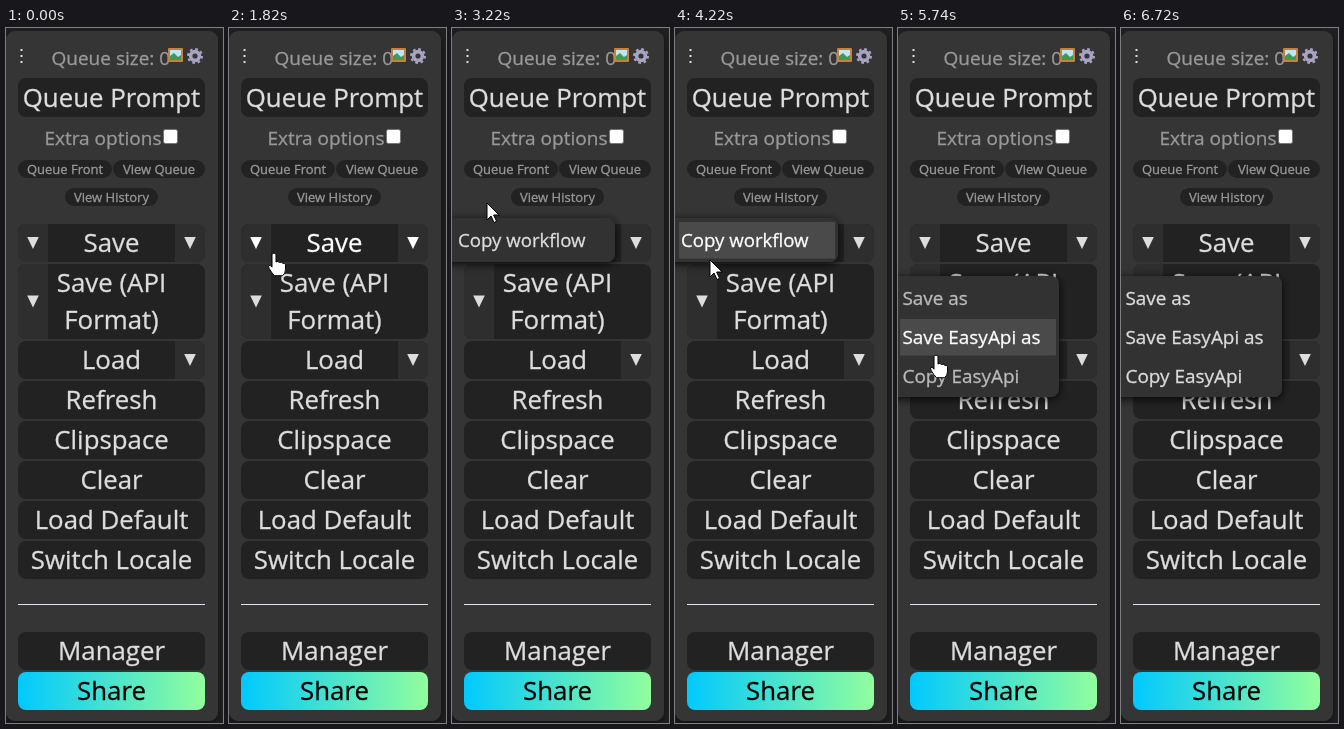
An HTML page that plays this animation: 217 px wide and 695 px high, repeating every 8.13 s.

```html
<!DOCTYPE html>
<html lang="en">
<head>
<meta charset="utf-8">
<title>Queue menu</title>
<style>
html, body { margin: 0; width: 100%; height: 100%; overflow: hidden; background: #202020; }
svg { display: block; }
text {
  font-family: "Open Sans", "Noto Sans", sans-serif;
  fill: currentColor; stroke: currentColor; stroke-width: .3;
}
.mid { text-anchor: middle; }
.btn { font-size: 25.8px; color: #ddd; fill: currentColor; }
.btn rect { fill: #222; }
.btn .cell { fill: #2e2e2e; }
.btn.hot { color: #fff; }
.btn .cell.lit { fill: #4c4c4c; }
.pill { font-size: 13px; color: #999; }
.label { font-size: 19px; color: #999; }
.menu { color: #ddd; }
.menu.bright { color: #f4f4f4; }
.menu.dim { color: #bbb; }
.menu .row { fill: none; }
.menu .hot { color: #fff; }
.menu .hot .row { fill: #4a4a4a; }
#cursor path { fill: #fff; stroke: #000; stroke-width: 1; stroke-linejoin: round; }
</style>
</head>
<body>
<svg id="stage" width="217" height="695" viewBox="0 0 217 695"></svg>
<script>
const LOOP = 8130;
const stage = document.getElementById('stage');
const $ = id => document.getElementById(id);

const box = (x, y, w, h, r, attrs = '') =>
  `<rect x="${x}" y="${y}" width="${w}" height="${h}" rx="${r}" ${attrs}/>`;
const label = (x, y, s, cls = '') => `<text x="${x}" y="${y}" class="${cls}">${s}</text>`;

// text lines, top, height, which sides carry a drop-down cell
const buttons = [
  [['Queue Prompt'], 50, 39, ''],
  [['Save'], 196, 38, 'LR'],
  [['Save (API', 'Format)'], 236, 75, 'L'],
  [['Load'], 313, 38, 'R'],
  [['Refresh'], 353, 38, ''],
  [['Clipspace'], 393, 38, ''],
  [['Clear'], 433, 38, ''],
  [['Load Default'], 473, 38, ''],
  [['Switch Locale'], 513, 38, ''],
  [['Manager'], 604, 38, '']
];
const SAVE = 1, API = 2;

function cell(side, y, h) {
  const left = side === 'L', x = left ? 12 : 169, m = y + h / 2;
  const d = left
    ? `M42 ${y}H20a8 8 0 0 0-8 8v${h - 16}a8 8 0 0 0 8 8h22z`
    : `M169 ${y}h22a8 8 0 0 1 8 8v${h - 16}a8 8 0 0 1-8 8h-22z`;
  return `<path class="cell ${side}" d="${d}"/><path d="M${x + 9.2} ${m - 6}h11.6l-5.8 12z"/>`;
}

function button([lines, y, h, sides], i) {
  const base = y + h / 2 + 9 - (lines.length - 1) * 18.5;
  return `<g class="btn" id="btn${i}">` + box(12, y, 187, h, 8) +
    [...sides].map(s => cell(s, y, h)).join('') +
    lines.map((s, k) => label(105.5, base + k * 37, s, 'mid')).join('') + '</g>';
}

const pill = (x, y, w, s) =>
  box(x, y, w, 18, 9, 'fill="#222"') + label(x + w / 2, y + 13.7, s, 'mid pill');

function menu(id, y, w, h, size, items, tx, rx, ry) {
  const rows = items.map((s, k) =>
    `<g>${box(rx, ry + k * 39, 156, 36.5, 1, 'class="row"')}${label(tx, ry + k * 39 + 25, s)}</g>`);
  return `<g class="menu" id="${id}" font-size="${size}">` +
    box(-12, y, w + 12, h, 8, 'fill="#323232" filter="url(#glow)"') + rows.join('') + '</g>';
}

const shadow = (id, dy, blur, alpha) =>
  `<filter id="${id}" x="-20%" y="-50%" width="140%" height="200%">
    <feDropShadow dx="0" dy="${dy}" stdDeviation="${blur}" flood-opacity="${alpha}"/>
  </filter>`;

stage.innerHTML = `
<defs>
  <linearGradient id="share"><stop stop-color="#00c9ff"/><stop offset="1" stop-color="#92fe9d"/></linearGradient>
  ${shadow('shadow', 4, 4, .5)}${shadow('glow', 2, 5, .85)}
</defs>` +
  box(0, 3, 212, 690, 9, 'fill="#353535" filter="url(#shadow)"') +
  [22, 28, 34].map(y => box(14.5, y - 1, 2, 2, 0, 'fill="#ddd"')).join('') +
  label(45.5, 37, 'Queue size: 0', 'label') +
  box(162, 20, 15, 14, 1, 'fill="#c8803a"') +
  box(164, 22, 11, 10, 0, 'fill="#bfe6f7"') +
  '<path d="M164 32v-4l4-3 4 4 3-2v5z" fill="#3f9a55"/>' +
  `<g fill="none" stroke="#aaa3c2">
    <circle cx="189" cy="28" r="4.4" stroke-width="3.6"/>
    <circle cx="189" cy="28" r="7" stroke-width="2" stroke-dasharray="2.75"/>
  </g>` +
  label(38.5, 116.5, 'Extra options', 'label') +
  box(157.5, 101.5, 14, 14, 2, 'fill="#fff" stroke="#767676"') +
  pill(12, 132, 94, 'Queue Front') +
  pill(107, 132, 92, 'View Queue') +
  pill(59, 160, 93, 'View History') +
  buttons.map(button).join('') +
  box(12, 576, 187, 1, 0, 'fill="#dde3e8"') +
  box(12, 644, 187, 38, 8, 'fill="url(#share)"') +
  '<g font-size="25.8">' + label(105.5, 672, 'Share', 'mid') + '</g>' +
  menu('copyMenu', 190, 163, 44, 18.6, ['Copy workflow'], 6, 4, 194) +
  menu('saveMenu', 248, 161, 121, 18.9, ['Save as', 'Save EasyApi as', 'Copy EasyApi'], 4.5, 2, 252) +
  `<g id="cursor">
    <path id="arrow" d="M0 0V17l4-4 3 6.5 2.6-1.2-3-6.3h5.6z"/>
    <path id="hand" d="M-2 1q2-2 4 0v8q2-1.5 3.5.5 2-1 3.3.8 2-.6 2.7 1.4v5q0 4-3 6h-8q-3-3-5.5-7.5-1.5-3 1-3l2 2z"/>
  </g>`;

// pointer tip: time, x, y
const path = [
  [1240, 1, 428], [1500, 27, 292], [1820, 45, 225], [1850, 45, 225], [2010, 33, 209],
  [2059, 33, 209], [2060, 31, 207], [3080, 31, 207], [3220, 35, 175],
  [3709, 35, 175], [3710, 35, 178], [4030, 35, 178], [4220, 35, 232], [4270, 35, 235],
  [4460, 31, 275], [5550, 31, 275], [5740, 38, 327], [5790, 38, 331],
  [5980, 38, 350], [6480, 38, 350], [6600, 30, 418], [6720, 2, 474]
];

function pointer(t) {
  const i = path.findIndex(p => p[0] > t);
  if (i < 1) return null;
  const [a, b] = [path[i - 1], path[i]];
  const k = (t - a[0]) / (b[0] - a[0]);
  return { x: a[1] + (b[1] - a[1]) * k, y: a[2] + (b[2] - a[2]) * k };
}

const show = (el, on) => el.style.display = on ? '' : 'none';

function hovered(t, p) {
  if (!p || p.x < 12) return -1;
  if (t >= 2390 && t < 3090) return SAVE;
  if (t >= 4820 && t < 5570) return API;
  const covered = t >= 4820 ? p.y > 248 && p.y < 369 : t >= 2390 && p.y > 190 && p.y < 234;
  return covered ? -1 : buttons.findIndex(b => p.y >= b[1] && p.y <= b[1] + b[2]);
}

function hotRow(t, p) {
  if (!p) return -1;
  if (t >= 4040 && t < 4460) return p.y > 192 && p.y < 234 ? 0 : -1;
  if (t >= 5570 && p.y < 369) return Math.min(2, Math.floor((p.y - 250) / 39));
  return -1;
}

function draw(t) {
  const p = pointer(t), over = hovered(t, p), row = hotRow(t, p);
  const copyOpen = t >= 2390 && t < 4820, saveOpen = t >= 4820;

  buttons.forEach((b, i) => {
    const g = $('btn' + i), left = g.querySelector('.L');
    g.classList.toggle('hot', i === over);
    if (left) left.classList.toggle('lit', i === over && p.x < 42);
  });

  for (const [id, open, owner] of [['copyMenu', copyOpen, SAVE], ['saveMenu', saveOpen, API]]) {
    const m = $(id);
    show(m, open);
    m.classList.toggle('bright', over === owner);
    m.classList.toggle('dim', row >= 0);
    m.querySelectorAll('g').forEach((g, k) => g.classList.toggle('hot', open && k === row));
  }

  show($('cursor'), p);
  if (!p) return;
  const arrow = p.x < 12 || (t >= 3090 && t < 4270);
  show($('arrow'), arrow);
  show($('hand'), !arrow);
  $('cursor').setAttribute('transform', `translate(${Math.round(p.x)} ${Math.round(p.y)})`);
}

const start = performance.now();
function tick() {
  draw((performance.now() - start) % LOOP);
  requestAnimationFrame(tick);
}
tick();
</script>
</body>
</html>
```
